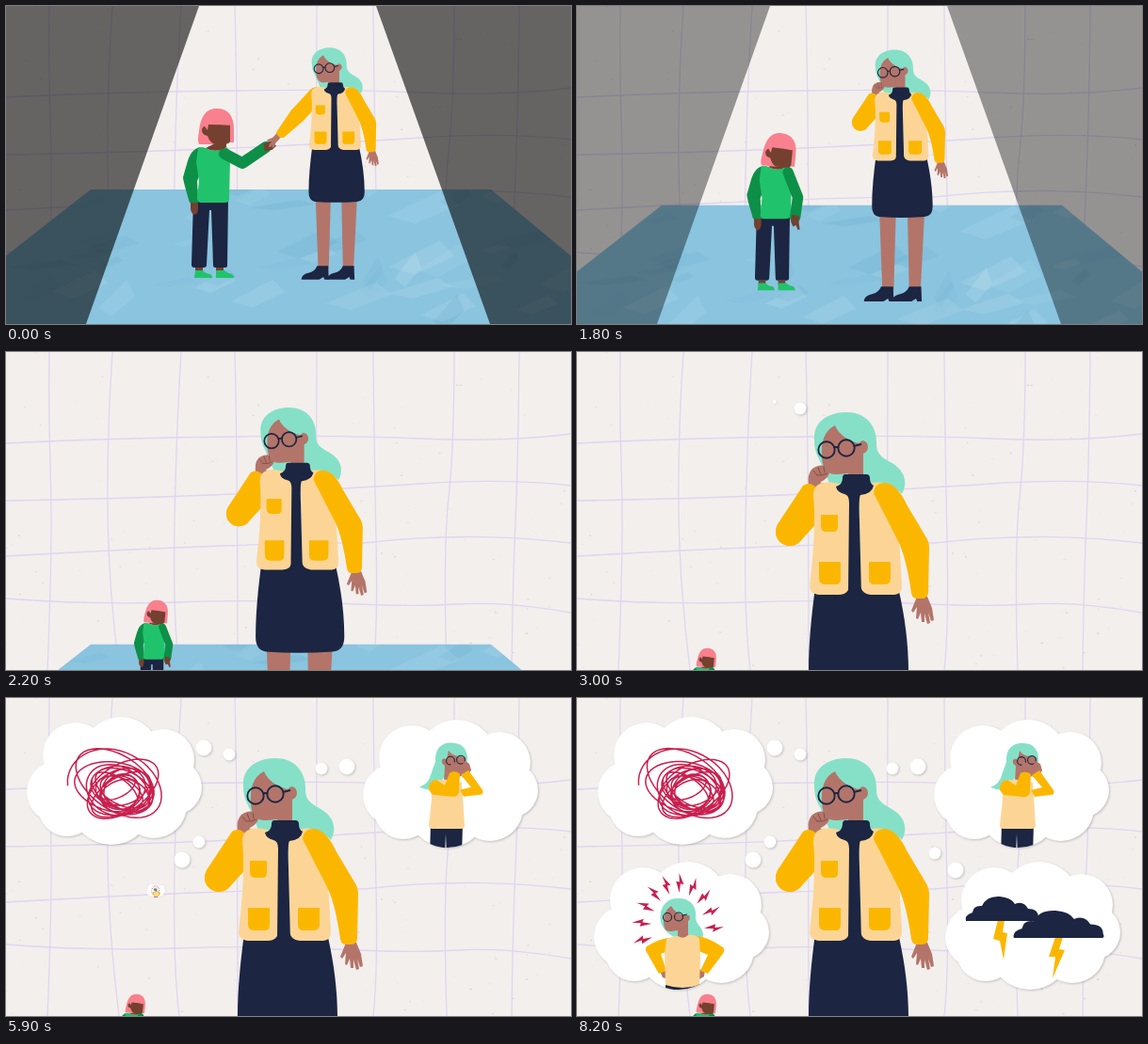
These frames come from a looping animation (600 px wide and 338 px high, 8300 ms). An HTML page:

```html
<!DOCTYPE html>
<html lang="en">
<head>
<meta charset="utf-8">
<title>Thought bubbles</title>
<style>
  html, body { margin: 0; width: 100%; height: 100%; overflow: hidden; background: #f3efed; }
  svg { display: block; width: 100vw; height: 100vh; }
  .navy { fill: #1c2541; }
  .skin { fill: #b3756a; }
  .mint { fill: #86e0c8; }
  .cream { fill: #fcd596; }
  .gold { fill: #fbb700; }
  .brown { fill: #74402f; }
  .pink { fill: #f9808e; }
  .leaf { fill: #20c36b; }
  .moss { fill: #0d8f47; }
  .red { fill: #c8204f; }
  .line { fill: none; stroke-linecap: round; stroke-linejoin: round; }
  .glasses { fill: none; stroke: #1c2541; }
  .puff { fill: #fff; filter: drop-shadow(1px 1.5px 1px rgba(60, 50, 60, .25)); }
</style>
</head>
<body>
<svg viewBox="0 0 600 338" preserveAspectRatio="none">
  <defs>
    <clipPath id="puffClip"></clipPath>
    <clipPath id="floorClip"><path d="M90 0H515L705 158H-112Z"/></clipPath>
  </defs>
  <rect width="600" height="338" fill="#f3efed"/>
  <g id="specks"></g>
  <g class="line" stroke="#e0d5f0" stroke-width="1.3">
    <path d="M46 0Q45 60 47 120T47 250T44 338M113 0Q107 90 108 170T120 338M186 0Q181 80 179 180T184 338M243 0Q246 120 246 338M330 0L329 338M390 0Q391 110 393 200T390 338M476 0Q476 100 470 155T468 338M545 0Q544 110 541 180T537 338"/>
    <path d="M0 97Q120 91 250 90Q350 88 440 92T600 87M0 158Q130 156 240 151T440 140T600 142M0 217Q120 210 230 206T380 203Q490 190 600 203M0 262Q90 269 180 266T350 267T480 268T600 277"/>
  </g>
  <g id="floor">
    <path d="M90 0H515L705 158H-112Z" fill="#8ac4df"/>
    <g id="creases" clip-path="url(#floorClip)"></g>
  </g>
  <path id="shade" fill-rule="evenodd" d="M0 0H600V338H0ZM205 0H393L514 338H85Z"/>

  <g id="child">
    <path class="navy" d="M199 205H236L235 276Q235 278 232 278H222Q220 278 220 275L218 217H216L213 275Q213 278 210 278H200Q197 278 197 275Z"/>
    <path class="brown" d="M201 278H209V283H201ZM223 278H231V283H223Z"/>
    <path class="leaf" d="M201 281H209Q211 284 217 285Q219 286 219 289H200ZM223 281H232Q235 284 240 285Q242 286 242 289H223Z"/>
    <path class="brown" d="M196 207H204V215Q204 221 200 222Q196 220 196 215Z"/>
    <path class="moss" d="M206 150Q196 152 192 168L188 182Q188 186 195 209H204L203 186L210 168Z"/>
    <path class="leaf" d="M204 151Q208 149 212 151Q222 157 234 150Q239 153 238 162L237 205Q237 209 232 209H207Q203 209 203 204L205 186L202 166Z"/>
    <path id="childArm" class="line" stroke="#0d8f47" stroke-width="12" stroke-linecap="butt"/>
    <path id="childHand" class="brown" d="M-2 -4L6 -5L13 -7L14 -5L9 -2L11 1L6 4L-2 4Z"/>
    <path class="brown" d="M212 151L220 147V140H234V150Q223 157 212 151Z"/>
    <g id="childHead">
      <path class="pink" d="M205 147Q203 144 205 133C207 116 213 109 224 109C236 109 242 117 242 131V145H237L234 128L224 147Z"/>
      <path class="brown" d="M213 124L238 126V144Q237 147 230 147H222Q217 146 214 138Q208 137 208 132Q209 127 213 128Z"/>
      <path class="pink" d="M211 128Q214 114 226 114Q238 116 240 127Q228 126 215 126L214 132Z"/>
    </g>
  </g>

  <g id="woman">
    <path class="mint" d="M252 94C250 75 266 64 286 64C306 64 319 78 318 98C318 113 331 114 340 122C350 131 350 142 345 151Q338 142 325 143L268 140Q262 124 256 112Q252 104 252 94Z"/>
    <path class="skin" d="M259 345H288L284 484H264ZM308 345H338L331 484H311Z"/>
    <path id="shoe" class="navy" d="M262 478H283L284 504H276L274 499L266 504H232Q232 494 247 491Q258 488 262 478Z"/>
    <use href="#shoe" x="49"/>
    <path class="navy" d="M253 250H341C348 280 352 310 352 338Q352 355 338 356Q298 359 258 356Q246 354 246 338C246 310 249 280 253 250Z"/>
    <path class="skin" d="M274 78C262 84 259 96 260 112C261 126 267 131 277 130L288 129V140H304V108Q309 106 309 101Q309 95 303 94L299 97C288 94 278 88 274 78Z"/>
    <g class="glasses" stroke-width="1.9">
      <circle cx="265" cy="104" r="8.7"/><circle cx="286" cy="102" r="8.7"/>
      <path d="M273 102Q275 100 278 102M294 100L302 98"/>
    </g>
    <path class="line" stroke="#fbb700" stroke-width="30" d="M260 154L226 191"/>
    <g id="forearm">
      <g id="fist">
        <path class="skin" d="M247 146Q243 131 250 124Q257 119 265 121Q270 123 268 128Q267 134 259 138L256 146Z"/>
        <path class="line" stroke="#85493f" stroke-width=".9" d="M251 126L255 131M256 123L259 130M262 122L263 128M255 131Q261 132 266 129"/>
      </g>
      <g id="openHand" class="line" stroke="#b3756a">
        <path stroke-width="11" d="M249 147L255 134"/>
        <path stroke-width="4.5" d="M254 134L255 120M256 134L261 119M257 136L267 128"/>
      </g>
      <path class="gold" d="M213 183L240 142Q248 136 257 147L240 198Z"/>
      <circle class="gold" cx="226" cy="191" r="15"/>
    </g>
    <path class="cream" d="M256 141Q264 136 278 140L290 152V246Q289 258 278 258H257Q247 257 247 249C250 224 254 182 251 153Q251 144 256 141ZM311 140Q322 136 335 143C341 180 344 220 345 249Q345 257 337 258H312Q301 257 301 246L300 152Z"/>
    <path class="navy" d="M282 134Q282 130 285 130H307Q311 130 311 134Q311 140 315 142Q313 151 301 152Q299 154 300 180L302 258H288L289 160Q289 152 284 151Q276 149 275 143Q282 141 282 134Z"/>
    <path class="gold" d="M259 173H277V186Q277 191 272 191H265Q259 191 259 185ZM257 223H280V241Q280 247 275 247H263Q257 247 257 240ZM310 223H333V240Q333 247 327 247H316Q310 247 310 241Z"/>
    <path class="skin" d="M361 260H372L377 272L379 285L376 286L373 277L375 288L372 289L369 278L369 287L366 287L365 277L362 284L360 283L361 271L357 277L355 275Z"/>
    <path class="gold" d="M315 150Q316 139 327 139Q340 140 350 162L369 194Q374 201 374 208L373 256Q372 262 366 262H361Q356 262 355 256Q350 221 342 203Z"/>
  </g>
  <g id="thoughts"></g>
</svg>
<script>
const $ = id => document.getElementById(id);
const LOOP = 8300;
const ease = p => p < .5 ? 4 * p ** 3 : 1 - 4 * (1 - p) ** 3;
const ramp = (t, start, span) => Math.min(1, Math.max(0, (t - start) / span));
const mix = (a, b, p) => a + (b - a) * p;
const place = (el, x, y, s, ax, ay) =>
  $(el).setAttribute('transform', `translate(${x} ${y}) scale(${s}) translate(${-ax} ${-ay})`);

let seed = 7;
const rnd = () => (seed = seed * 16807 % 2147483647) / 2147483647;

// Paper grain and floor folds
let specks = '', creases = '';
for (let i = 0; i < 130; i++)
  specks += `<ellipse cx="${rnd() * 600}" cy="${rnd() * 338}" rx="${.4 + rnd()}" ry="${.3 + rnd() * .5}" fill="#806c66" opacity="${.08 + rnd() * .16}"/>`;
for (let i = 0; i < 46; i++) {
  const x = rnd() * 640 - 20, y = rnd() * 150, w = 15 + rnd() * 45, h = 8 + rnd() * 22;
  creases += `<path d="M${x} ${y}l${w} ${-h}l${w * .3} ${h * .6}l${-w * .8} ${h * .7}z" fill="${i % 2 ? '#fff' : '#3f86ad'}" opacity="${.04 + rnd() * .07}"/>`;
}
$('specks').innerHTML = specks;
$('creases').innerHTML = creases;

// Thought bubble shape
const puff = [[122, 62, 42], [74, 61, 35], [167, 66, 33], [55, 100, 33], [179, 95, 29],
  [65, 116, 31], [112, 113, 43], [157, 114, 35]]
  .map(([x, y, r]) => `<circle cx="${x}" cy="${y}" r="${r}"/>`).join('');
$('puffClip').innerHTML = puff;

function scribble() {
  let d = '';
  for (let i = 0; i <= 700; i++) {
    const k = i / 700, a = k * 15.5 * Math.PI * 2;
    const r = 23 + 25 * (1 - k) ** 2.6 + 8 * Math.sin(a * .29) * k;
    const x = 113 + 9 * Math.min(1, k * 4) + 5 * Math.sin(a * .37) + r * Math.cos(a + 3);
    const y = 87 + 12 * Math.min(1, k * 4) + 4 * Math.sin(a * .53) + r * .78 * Math.sin(a + 3 + .5 * Math.sin(a * .21));
    d += (i ? 'L' : 'M') + x.toFixed(1) + ' ' + y.toFixed(1);
  }
  return `<path id="scribble" class="line" stroke="#c8204f" stroke-width="1.5" pathLength="1" stroke-dasharray="1 2" d="${d}"/>`;
}

const crying = `
  <path class="navy" d="M451 132H485L484 170H468L467 144L466 170H450Z"/>
  <g id="sob">
    <path class="mint" d="M456 68C455 53 464 47 474 48C486 48 491 57 490 68L478 82L464 86Q462 97 452 98Q446 98 439 95Q449 91 451 82Q453 76 456 68Z"/>
    <path class="skin" d="M470 56Q474 63 488 63L489 75Q488 84 478 84L475 90H465L466 72Q462 70 463 66Q465 63 468 66Z"/>
    <g class="glasses" stroke-width="1.1"><circle cx="472" cy="67" r="4.4"/><circle cx="483" cy="66" r="4.4"/></g>
  </g>
  <path class="cream" d="M451 89Q468 84 484 90L487 136Q487 139 483 139H453Q449 139 449 135L452 108Z"/>
  <g id="sobArms">
    <path class="skin" d="M472 82L471 73L475 68L480 71L483 77L480 83ZM484 84L482 75L487 67L492 70L494 77L490 83Z"/>
    <path class="gold" d="M483 82L491 77L506 98Q508 103 503 103L486 105L482 98L494 95Z"/>
    <path class="gold" d="M449 98Q448 88 457 87L466 93L471 80Q477 77 482 81L481 101Q479 106 473 105L453 103Z"/>
  </g>`;

let bolts = '';
for (let i = 0; i < 10; i++) {
  const a = (166 + i * 21.5) * Math.PI / 180;
  bolts += `<path class="red" transform="translate(${107 + 39 * Math.cos(a)} ${245 + 49 * Math.sin(a)}) rotate(${166 + i * 21.5})" d="M-11 0L1 -4.2L.5 -.6L10 -1.5L-2 4.2L-1 .6Z"/>`;
}
const angry = `
  <g id="bolts">${bolts}</g>
  <path class="mint" d="M89 238C86 222 96 212 108 213C121 213 127 222 126 232C125 241 134 243 134 252Q133 259 124 259L108 256Q92 250 89 238Z"/>
  <path class="skin" d="M100 221Q92 226 92 238Q92 249 100 248L107 247V257H118V237Q121 235 119 231L115 231Q105 230 100 221Z"/>
  <g class="glasses" stroke-width="1.1"><circle cx="96" cy="233" r="4.5"/><circle cx="108" cy="232.500" r="4.500"/><path d="M112 231L117 230"/></g>
  <path class="navy" d="M94 300H130V315H94Z"/>
  <path class="skin" d="M88 290L97 289L101 294L97 299L91 297ZM136 288L127 289L123 295L128 300L135 296Z"/>
  <path class="gold" d="M97 255Q87 256 74 264Q71 267 75 272L87 293L95 290L89 272L99 268ZM124 253Q136 252 155 265Q158 268 154 273L139 293L131 290L139 273L127 268Z"/>
  <path class="cream" d="M95 256Q101 253 107 253Q113 257 118 252Q126 251 130 256L131 275L130 305Q112 311 94 305L93 272Z"/>`;

const stormPuff = 'M0 26Q-2 20 7 17Q8 9 17 10Q22 -1 36 0Q48 1 52 8Q61 4 66 13Q77 13 77 22Q79 26 75 26Z';
const storm = `
  <path id="bolt1" class="gold" d="M447 236H454L452 249L457 250L453 278L449 258L442 256Z"/>
  <path id="bolt2" class="gold" d="M508 254H516L512 267L518 268L505 298L508 275L501 275Z"/>
  <path id="storm1" class="navy" d="${stormPuff}"/>
  <path id="storm2" class="navy" d="${stormPuff}"/>`;

// dx, dy: bubble offset; ox, oy: point it grows from; dots: trail from the head
const thoughts = [
  { at: 3280, dx: 0, dy: 0, ox: 178, oy: 62, dots: [[237, 60], [210, 53]], art: scribble() },
  { at: 4510, dx: 357, dy: 3, ox: 397, oy: 78, dots: [[335, 75], [362, 73]], art: crying },
  { at: 5750, dx: -4, dy: 154, ox: 165, oy: 200, dots: [[205, 153], [187, 172]], art: angry },
  { at: 7000, dx: 369, dy: 154, ox: 431, oy: 199, dots: [[380, 165], [402, 183]], art: storm }
];
$('thoughts').innerHTML = thoughts.map((c, i) => `
  <circle id="dot${i}0" class="puff" r="6.5"/><circle id="dot${i}1" class="puff" r="8.5"/>
  <g id="cloud${i}"><g transform="translate(${c.dx} ${c.dy})">
    <g class="puff">${puff}</g>
    <g clip-path="url(#puffClip)"><g transform="translate(${-c.dx} ${-c.dy})">${c.art}</g></g>
  </g></g>`).join('');

function draw(t) {
  const zoom = ease(ramp(t, 1400, 1330));
  const pose = ease(ramp(t, 900, 650));

  $('floor').setAttribute('transform', `translate(0 ${195 + 155 * zoom})`);
  $('shade').setAttribute('opacity', .58 * (1 - ramp(t, 1600, 600)));

  place('woman', 350 - 53 * zoom, 153 + 105 * zoom, .56 + .44 * zoom, 297, 258);
  $('forearm').setAttribute('transform', `rotate(${-164 * (1 - pose)} 226 191)`);
  $('fist').style.display = pose > .5 ? '' : 'none';
  $('openHand').style.display = pose > .5 ? 'none' : '';

  place('child', 219 - 84 * zoom, 208 + 158 * zoom, 1 - .46 * zoom, 219, 208);
  const ex = mix(251, 245, pose), ey = mix(167, 185, pose);
  const hx = mix(276, 242, pose), hy = mix(150, 207, pose);
  $('childArm').setAttribute('d', `M${mix(232, 234, pose)} 157L${ex} ${ey}L${hx} ${hy}`);
  $('childHand').setAttribute('transform', `translate(${hx} ${hy}) rotate(${mix(-12, 98, pose)})`);
  $('childHead').setAttribute('transform', `translate(${-1 * pose} ${4 * pose}) rotate(${6 * pose} 224 148)`);

  thoughts.forEach((c, i) => {
    c.dots.forEach(([x, y], j) => place(`dot${i}${j}`, x, y, ease(ramp(t, c.at - 600 + 200 * j, 300)), 0, 0));
    place('cloud' + i, c.ox, c.oy, ease(ramp(t, c.at, 500)), c.ox, c.oy);
  });

  // Small idle movement inside the bubbles
  const sway = Math.sin((t - 7100) / 550 * Math.PI * 2);
  $('scribble').setAttribute('stroke-dashoffset', 1 - ramp(t, 3400, 1000));
  $('scribble').setAttribute('transform', `rotate(${sway * .7} 115 90)`);
  $('sob').setAttribute('transform', `translate(0 ${sway * .4})`);
  $('sobArms').setAttribute('transform', `translate(0 ${sway * .4})`);
  place('bolts', 107, 245, 1 + sway * .02, 107, 245);
  $('storm1').setAttribute('transform', `translate(${413 + sway * .5} 211)`);
  $('storm2').setAttribute('transform', `translate(${464 - sway * .5} 226) scale(1.23 1.12)`);
}

function tick(now) {
  draw(Math.floor(now % LOOP / 100) * 100);
  requestAnimationFrame(tick);
}
draw(0);
requestAnimationFrame(tick);
</script>
</body>
</html>
```
